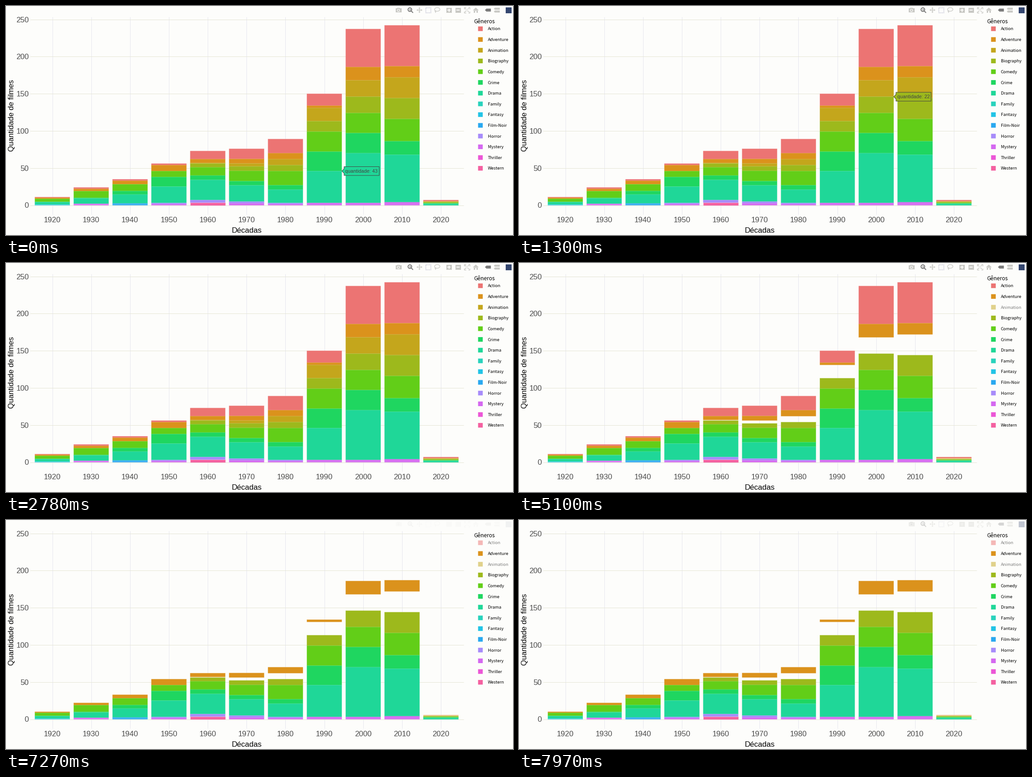
A matplotlib script that plays this animation: 1111x504 px, repeating every 8000 ms.

```python
import matplotlib.pyplot as plt
import numpy as np
from matplotlib.animation import FuncAnimation
from matplotlib.collections import LineCollection, PatchCollection
from matplotlib.colors import to_rgb
from matplotlib.patches import Circle, Polygon, Rectangle

WIDTH, HEIGHT, DPI = 1111, 504, 72
LOOP_MS, STEP_MS = 8000, 40
PAPER = "#fdfdfb"
SANS, LEGEND_FONT = "Liberation Sans", "Noto Sans CJK JP"
BAR_YEARS = 9

COLORS = {
    "Action": "#ec7473", "Adventure": "#db921c", "Animation": "#c4a61c",
    "Biography": "#9db91c", "Comedy": "#62ce18", "Crime": "#1fd660",
    "Drama": "#1fd798", "Family": "#28d2bc", "Fantasy": "#22c4e6",
    "Film-Noir": "#29a8f0", "Horror": "#a78bfa", "Mystery": "#d468f0",
    "Thriller": "#ec56d6", "Western": "#f460a0",
}
MAIN = list(COLORS)[6::-1]  # Drama at the bottom, Action on top
DECADES = range(1920, 2030, 10)

# Counts at key decades: rare genres together, then MAIN from the bottom up.
# The decades between share their films out in interpolated proportions.
KEY_STACKS = {
    1930: (2, 7, 1, 9, 0, 0, 3, 2),
    1950: (3, 22, 13, 8, 0, 0, 8, 2),
    1960: (7, 27, 6, 11, 5, 1, 5, 11),
    1980: (3, 18, 6, 19, 8, 8, 8, 19),
    1990: (3, 43, 26, 27, 14, 18, 3, 16),
    2000: (3, 67, 27, 27, 22, 22, 18, 51),
    2010: (4, 64, 18, 30, 28, 28, 15, 55),
}
OTHER_TOTALS = {1920: 11, 1940: 35, 1970: 76, 2020: 7}
RARE = {1920: "Fantasy", 1940: "Film-Noir", 1960: "Western", 2020: "Drama"}

# Pointer path: time, year, number of films
POINTER = np.array([
    (0, 1992, 30), (340, 1994.5, 45), (960, 1999, 97), (1300, 2003, 140),
    (1500, 2006.5, 152), (1930, 2012, 144), (2050, 2014.5, 130), (2180, 2016, 115),
    (2320, 2014.5, 90), (2380, 2013.5, 85.9), (2780, 2014.5, 75), (2900, 2018, 70),
])
HIDDEN_FROM = {"Animation": 5100, "Action": 6380}


def stack(decade):
    if decade in KEY_STACKS:
        return np.array(KEY_STACKS[decade], float)
    shares = np.array([np.array(s) / sum(s) for s in KEY_STACKS.values()])
    return OTHER_TOTALS[decade] * np.array(
        [np.interp(decade, list(KEY_STACKS), column) for column in shares.T])


STACKS = {d: stack(d) for d in DECADES}


def px_x(year):
    return 101.5 + (year - 1920) * 8.515


def px_y(value):
    return 438.5 - value * 1.636


def lighten(color, amount):
    return tuple(c + (1 - c) * amount for c in to_rgb(color))


fig = plt.figure(figsize=(WIDTH / DPI, HEIGHT / DPI), dpi=DPI, facecolor=PAPER)
ax = fig.add_axes([0, 0, 1, 1])
ax.set_xlim(0, WIDTH)
ax.set_ylim(HEIGHT, 0)
ax.axis("off")


def label(x, y, text, size, color="black", font=SANS, **kwargs):
    return ax.text(x, y, text, fontsize=size, color=color, family=font, **kwargs)


def draw_axes():
    values = range(0, 251, 50)
    rows = [[(53, px_y(v)), (1003, px_y(v))] for v in values]
    columns = [[(px_x(d), 24), (px_x(d), 459)] for d in DECADES]
    ax.add_collection(LineCollection(columns, colors="#e6e6ee", linewidths=1, zorder=1))
    ax.add_collection(LineCollection(rows, colors="#e5e5d5", linewidths=1, zorder=1))
    for v in values:
        label(50, px_y(v) + 6, str(v), 16.6, "#4d4d4d", ha="right")
    for d in DECADES:
        label(px_x(d), 476, str(d), 16.6, "#4d4d4d", ha="center")
    label(527.5, 499, "Décadas", 16.6, ha="center")
    label(17, 240.5, "Quantidade de filmes", 16.6, rotation=90,
          rotation_mode="anchor", ha="center")


def draw_bars():
    rects = {genre: [] for genre in COLORS}
    for decade, counts in STACKS.items():
        left, right = px_x(decade - BAR_YEARS / 2), px_x(decade + BAR_YEARS / 2)

        def add(genre, low, high):
            if high > low:
                rects[genre].append(Rectangle((left, px_y(high)), right - left,
                                              px_y(low) - px_y(high)))

        tops = np.cumsum(counts)
        rare = RARE.get(decade, "Mystery")
        add(rare, 0, tops[0] / 2)
        add("Horror" if 1950 <= decade <= 1980 else rare, tops[0] / 2, tops[0])
        for genre, low, high in zip(MAIN, tops, tops[1:]):
            add(genre, low, high)
    return {genre: ax.add_collection(PatchCollection(
        shapes, facecolor=COLORS[genre], edgecolor=lighten(COLORS[genre], 0.25),
        linewidth=0.5, snap=False, zorder=2)) for genre, shapes in rects.items() if shapes}


def draw_legend():
    label(1025, 38, "Gêneros", 11.8, font=LEGEND_FONT)
    items = {}
    for i, (genre, color) in enumerate(COLORS.items()):
        y = 50 + i * 23.62
        swatch = ax.add_patch(Rectangle((1034.5, y - 5), 10.2, 10.2, facecolor=color,
                                        linewidth=0, snap=False))
        items[genre] = swatch, label(1056, y + 3.4, genre, 9.4, font=LEGEND_FONT)
    return items


def draw_modebar():
    light, dark = "#c9c9c5", "#7b7b7b"
    signs = (-1, 1)
    parts = []

    def fill(color, *patches):
        parts.append(ax.add_collection(PatchCollection(
            patches, facecolor=color, linewidth=0, zorder=5)))

    def stroke(color, width, *lines, style="solid"):
        parts.append(ax.add_collection(LineCollection(
            lines, colors=color, linewidths=width, linestyles=style, zorder=6)))

    def box(x, y, w, h):
        return Rectangle((x, y), w, h)

    def tag(x, y, h):
        return Polygon([(x, y), (x + h / 2, y - h / 2), (x + 13, y - h / 2),
                        (x + 13, y + h / 2), (x + h / 2, y + h / 2)])

    def cross(x, y, r):
        return [(x - r, y), (x + r, y)], [(x, y - r), (x, y + r)]

    def ring(cx, cy, rx, ry):
        a = np.linspace(0, 2 * np.pi, 40)
        return np.column_stack([cx + rx * np.cos(a), cy + ry * np.sin(a)])

    # camera
    fill(light, box(853.5, 5, 13, 9), box(857, 3.5, 6, 2))
    fill(PAPER, Circle((860, 9.5), 3.2))
    fill(light, Circle((860, 9.5), 2))
    # zoom
    stroke(dark, 2, ring(885, 8, 4, 4), [(888, 11), (892, 15)])
    stroke(dark, 1, *cross(885, 8, 2))
    # pan
    stroke(light, 1.5, *cross(906, 9, 5))
    for s in signs:
        fill(light,
             Polygon([(906 + 6.5 * s, 9), (906 + 3.5 * s, 6.7), (906 + 3.5 * s, 11.3)]),
             Polygon([(906, 9 + 6.5 * s), (903.7, 9 + 3.5 * s), (908.3, 9 + 3.5 * s)]))
    # box and lasso select
    stroke("#c6c6d6", 1.5, box(919.5, 3.5, 11, 11).get_corners()[[0, 1, 2, 3, 0]],
           style=(0, (1.4, 0.9)))
    stroke(light, 1.3, ring(945, 7.5, 5.8, 4), [(940.5, 10), (940, 12), (942, 12.5), (941, 15)])
    # zoom in, zoom out
    fill(light, box(964.5, 3.5, 12, 11.5), box(984.5, 3.5, 12, 11.5))
    stroke(PAPER, 2, *cross(970.5, 9, 3.5), cross(990.5, 9, 3.5)[0])
    # autoscale
    for sx in signs:
        for sy in signs:
            corner = np.array([(6, 2.5), (6, 6), (2.5, 6)])
            stroke(light, 1.4, (1010, 9) + corner * (sx, sy),
                   [(1010 + sx, 9 + sy), (1010 + 4.5 * sx, 9 + 4.5 * sy)])
    # home
    fill(light, Polygon([(1029.5, 3.5), (1036, 9.5), (1023, 9.5)]),
         box(1025, 9.5, 3.2, 5), box(1030.8, 9.5, 3.2, 5), box(1028, 9.5, 3, 1.8))
    # hover modes
    fill(dark, tag(1049.5, 9, 6.5))
    fill(light, tag(1069, 6, 4.5), tag(1069, 12.2, 4.5))
    fill("#34466f", box(1095, 3, 12.5, 12.5))
    return parts


draw_axes()
bars = draw_bars()
legend = draw_legend()
modebar = draw_modebar()

CALLOUT = np.array([(0, 0), (5, 5), (5, 9.7), (82, 9.7), (82, -9.7), (5, -9.7), (5, -5)])
callout = ax.add_patch(Polygon(CALLOUT, edgecolor="#444444", linewidth=1, zorder=7))
callout_text = label(0, 0, "", 10.6, "#444444", zorder=8)


def segment_at(year, value):
    """Decade and position in the stack under the pointer, or None."""
    decade = int(round(year, -1))
    tops = np.cumsum(STACKS[decade])
    if abs(year - decade) >= BAR_YEARS / 2 or not tops[0] < value < tops[-1]:
        return None
    return decade, int(np.searchsorted(tops, value))


def show_hover(t):
    times, years, values = POINTER.T
    hit = segment_at(np.interp(t, times, years), np.interp(t, times, values))
    callout.set_visible(hit is not None)
    callout_text.set_visible(hit is not None)
    if hit:
        decade, level = hit
        counts = STACKS[decade]
        x, y = px_x(decade + BAR_YEARS / 2), px_y(counts[:level + 1].sum())
        callout.set_xy(CALLOUT + (x, y))
        callout.set_facecolor(COLORS[MAIN[level - 1]])
        callout_text.set_position((x + 7.5, y + 3.8))
        callout_text.set_text(f"quantidade: {counts[level]:.0f}")


def update(frame):
    t = (frame + 0.5) * STEP_MS
    show_hover(t)
    for genre, start in HIDDEN_FROM.items():
        bars[genre].set_visible(t < start)
        for item in legend[genre]:
            item.set_alpha(1 if t < start else 0.5)
    opacity = np.interp(t, [6870, 7260, 7630, 7700, 7980], [1, 0.06, 0, 0, 0.3])
    for part in modebar:
        part.set_alpha(opacity)
    return []


anim = FuncAnimation(fig, update, frames=LOOP_MS // STEP_MS, interval=STEP_MS,
                     repeat=True, repeat_delay=0)
plt.show()
```
